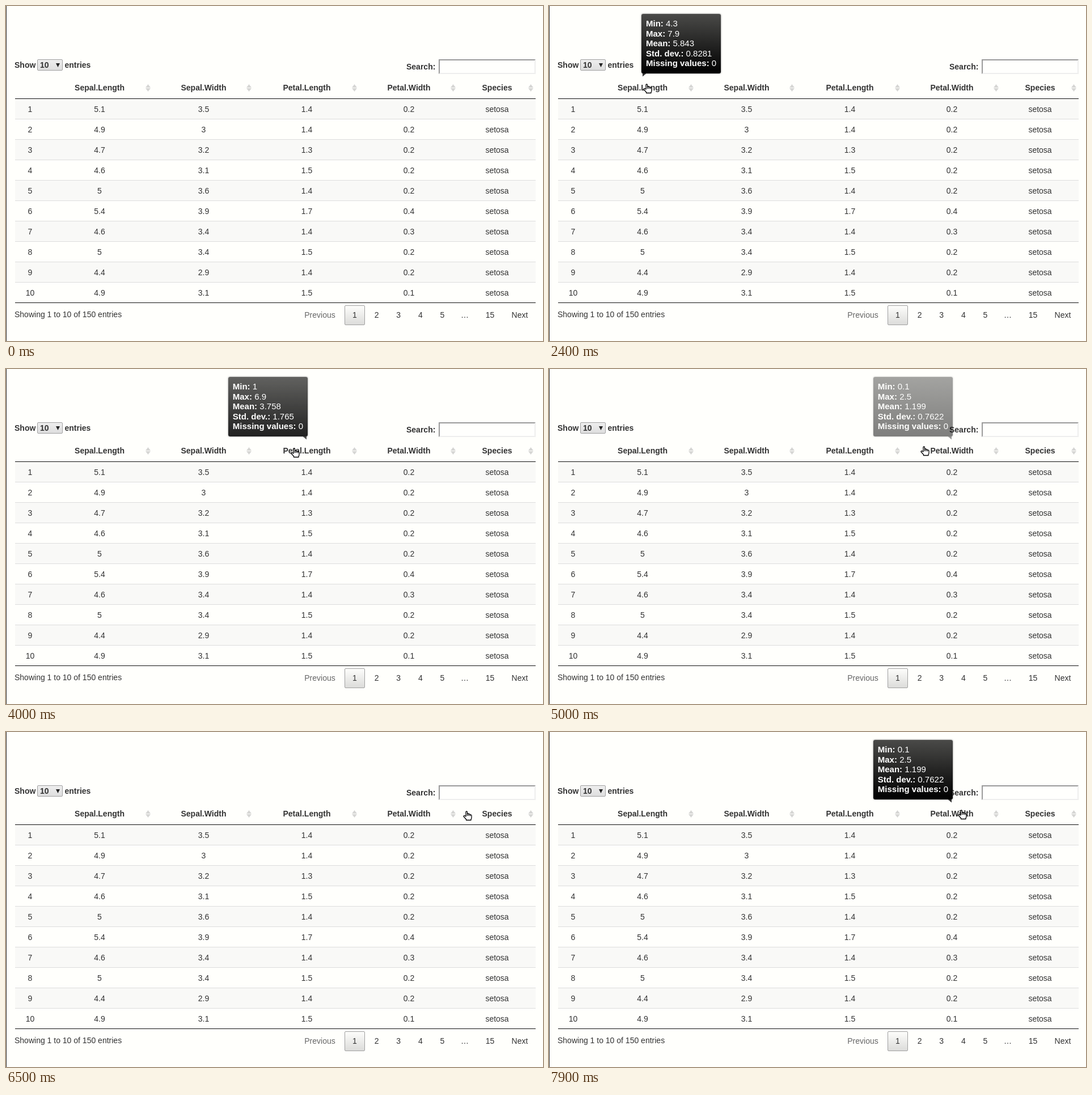
These frames come from a looping animation (947x591 px, 8000 ms). An HTML page:

```html
<!DOCTYPE html>
<html lang="en">
<head>
<meta charset="utf-8">
<title>Column summary tooltips</title>
<style>
html, body { margin: 0; width: 100%; height: 100%; overflow: hidden; background: #fffffc; }
#page {
  position: relative; width: 947px; height: 591px; overflow: hidden;
  font: 14px/20px "Liberation Sans", Arial, sans-serif; color: #333;
}
#page > * { position: absolute; box-sizing: border-box; }
.edge { left: 0; top: 0; width: 1px; height: 591px; background: #333; }
.t { white-space: nowrap; }
.mid { width: 120px; margin-left: -60px; text-align: center; }
.b { font-weight: bold; }
table { left: 16px; top: 164px; width: 918px; table-layout: fixed; border-spacing: 0; }
td { height: 36px; padding: 0; box-sizing: border-box; border-bottom: 1px solid #ddd; text-align: center; }
td:last-child { padding-left: 1px; }
td:nth-child(5) { padding-right: 1px; }
tr:nth-child(odd) { background: #f9f9f7; }
.rule { left: 16px; width: 918px; height: 1px; background: #111; }
.up, .down { width: 9px; height: 6px; margin-left: -4px; top: 138px; background: #d6d6d4; clip-path: polygon(50% 0, 100% 100%, 0 100%); }
.down { top: 145px; transform: scaleY(-1); }
.select {
  left: 55px; top: 94px; width: 45px; height: 20px;
  border: 1px solid #a0a0a0; border-radius: 2px;
  background: linear-gradient(#eee, #dedede);
}
.caret { left: 88px; top: 101px; width: 7px; height: 7px; background: #222; clip-path: polygon(0 0, 100% 0, 50% 100%); }
.search { left: 763px; top: 94px; width: 171px; height: 26px; border: 2px solid; border-color: #9a9a9a #eee #eee #9a9a9a; background: #fffffd; }
.current { left: 597px; top: 528px; width: 36px; height: 35px; border: 1px solid #a0a0a0; border-radius: 2px; background: linear-gradient(#fdfdfb, #dcdcda); }
.tip {
  bottom: 472.5px; padding: 8.75px 8px; border-radius: 3px; opacity: 0;
  font-size: 15px; line-height: 17.5px; color: #fff; white-space: nowrap;
  background: linear-gradient(#4a4a48, #000); box-shadow: 0 0 3px #777;
}
.tip::after {
  content: ""; position: absolute; right: 2px; top: 100%; width: 7px; height: 6px;
  background: #333; clip-path: polygon(0 0, 100% 0, 100% 100%);
}
.tip.east::after { right: auto; left: 2px; clip-path: polygon(0 0, 100% 0, 0 100%); }
#cursor { left: 0; top: 0; overflow: visible; }
</style>
</head>
<body>
<div id="page">
  <div class="edge"></div>
  <table>
    <colgroup><col style="width:53px"><col style="width:192px"><col style="width:175px"><col style="width:189px"><col style="width:172px"><col></colgroup>
    <tbody>
    <tr><td>1<td>5.1<td>3.5<td>1.4<td>0.2<td>setosa
    <tr><td>2<td>4.9<td>3<td>1.4<td>0.2<td>setosa
    <tr><td>3<td>4.7<td>3.2<td>1.3<td>0.2<td>setosa
    <tr><td>4<td>4.6<td>3.1<td>1.5<td>0.2<td>setosa
    <tr><td>5<td>5<td>3.6<td>1.4<td>0.2<td>setosa
    <tr><td>6<td>5.4<td>3.9<td>1.7<td>0.4<td>setosa
    <tr><td>7<td>4.6<td>3.4<td>1.4<td>0.3<td>setosa
    <tr><td>8<td>5<td>3.4<td>1.5<td>0.2<td>setosa
    <tr><td>9<td>4.4<td>2.9<td>1.4<td>0.2<td>setosa
    <tr><td>10<td>4.9<td>3.1<td>1.5<td>0.1<td>setosa
    </tbody>
  </table>
  <div class="rule" style="top:163px"></div>
  <div class="rule" style="top:523px"></div>
  <div class="select"></div>
  <div class="caret"></div>
  <div class="search"></div>
  <div class="current"></div>
  <svg id="cursor" width="18" height="20" fill="#fff" stroke="#000" stroke-width="1.3" stroke-linejoin="round" style="z-index:1">
    <path id="arrow" d="M1 1V14l3-3 2 5 2-1-2-4h4z"/>
    <path id="hand" d="M5 10V2q0-1 1.2-1T7.5 2V8.5V5.5q1.2-1.5 2.5 0V8.5V6q1.5-1 2.5 .5V8.8V7q2-.5 2.5 1.2V12q0 2-1 3v1.5H5.5V15L1 10q0-2 2-1.3z"/>
  </svg>
</div>
<script>
const $ = id => document.getElementById(id);
const page = $("page");

function add(cls, css, html = "") {
  const el = document.createElement("div");
  el.className = cls;
  el.innerHTML = html;
  Object.assign(el.style, css);
  page.append(el);
  return el;
}
const text = (s, x, y, cls = "") => add("t " + cls, { left: x + "px", top: y + "px" }, s);

// Controls
text("Show", 15, 94, "b");
text("10", 60, 94, "b");
text("entries", 103.5, 94, "b");
text("Search:", 706, 97, "b");

// Column heads with sort marks
function head(name, x, sortX) {
  text(name, x, 134, "b mid");
  add("up", { left: sortX + "px" });
  add("down", { left: sortX + "px" });
}
head("Sepal.Length", 165, 250);
head("Sepal.Width", 348.5, 428);
head("Petal.Length", 530.5, 614);
head("Petal.Width", 710.5, 788);
head("Species", 866, 925);

// Footer
text("Showing 1 to 10 of 150 entries", 15, 534);
text("Previous", 553.5, 535, "mid").style.color = "#666";
for (let i = 0; i < 5; i++) text(i + 1, 615 + 38.6 * i, 535, "mid");
text("…", 809, 535, "mid");
text("15", 853.5, 535, "mid");
text("Next", 906, 535, "mid");

// Tooltips, each with the tenths at which it starts to show and to hide
const line = (label, value) => `<b>${label}:</b> ${value}<br>`;
const stats = (min, max, mean, dev) =>
  line("Min", min) + line("Max", max) + line("Mean", mean) + line("Std. dev.", dev) + line("Missing values", 0);
const tips = [];
function tip(html, x, east, ...spans) {
  const css = east ? { left: x + "px" } : { right: 947 - x + "px" };
  tips.push({ el: add(east ? "tip east" : "tip", css, html), spans });
}
tip(stats(4.3, 7.9, 5.843, 0.8281), 163, true, { from: 14, to: 27 });
tip(stats(2, 4.4, 3.057, 0.4359), 347, true, { from: 28, to: 38 });
tip(stats(1, 6.9, 3.758, 1.765), 532, false, { from: 39, to: 47 });
tip(stats(0.1, 2.5, 1.199, 0.7622), 712, false, { from: 49.5, to: 63 }, { from: 76.5, to: 99 });
tip(line("Number of levels", 3) + "<b>Levels:</b><br>setosa, versicolor, virginica<br>" + line("Missing values", 0),
  868.5, false, { from: 66, to: 75 });

const clamp = v => Math.min(1, Math.max(0, v));
const swing = v => .5 - Math.cos(Math.PI * clamp(v)) / 2;
const shown = (k, { from, to }) => k < to ? swing((k - from + .45) / 1.9) : swing((to + 1 - k) / 2);

// Pointer stops: tenths of a second, x, y
const path = `8 124 9, 11 137 104, 12 144 129, 16 162 135, 17 170 136, 18 167 136, 23 167 136, 24 166 137,
  25 166 137, 27 258 140, 29 291 141, 30 291 141, 33 337 141, 36 337 141, 39 474 140, 40 502 139,
  41 502 139, 43 524 139, 46 524 139, 50 655 136, 51 703 138, 52 703 138, 53 715 138, 54 715 138, 55 715 139,
  60 715 139, 61 714 136, 65 806 139, 69 861 140, 71 861 140, 72 849 142, 73 849 142, 74 819 143,
  76 762 143, 77 762 143, 79 721 137`.split(",").map(s => s.trim().split(" ").map(Number));

function place(k) {
  const n = Math.max(1, path.findIndex(p => p[0] >= k));
  const [t0, x0, y0] = path[n - 1], [t1, x1, y1] = path[n];
  const f = clamp((k - t0) / (t1 - t0));
  return [Math.round(x0 + (x1 - x0) * f), Math.round(y0 + (y1 - y0) * f)];
}

// The screen refreshes ten times a second
function draw(now) {
  const k = Math.floor(now % 8000 / 100);
  const [x, y] = place(k);
  $("cursor").style.visibility = k < 8 ? "hidden" : "visible";
  $("cursor").style.transform = `translate(${x}px, ${y}px)`;
  $("arrow").style.display = y < 124 ? "" : "none";
  $("hand").style.display = y < 124 ? "none" : "";
  for (const { el, spans } of tips) el.style.opacity = Math.max(...spans.map(s => shown(k, s)));
}
const start = performance.now();
function loop() {
  draw(performance.now() - start);
  requestAnimationFrame(loop);
}
loop();
</script>
</body>
</html>
```
